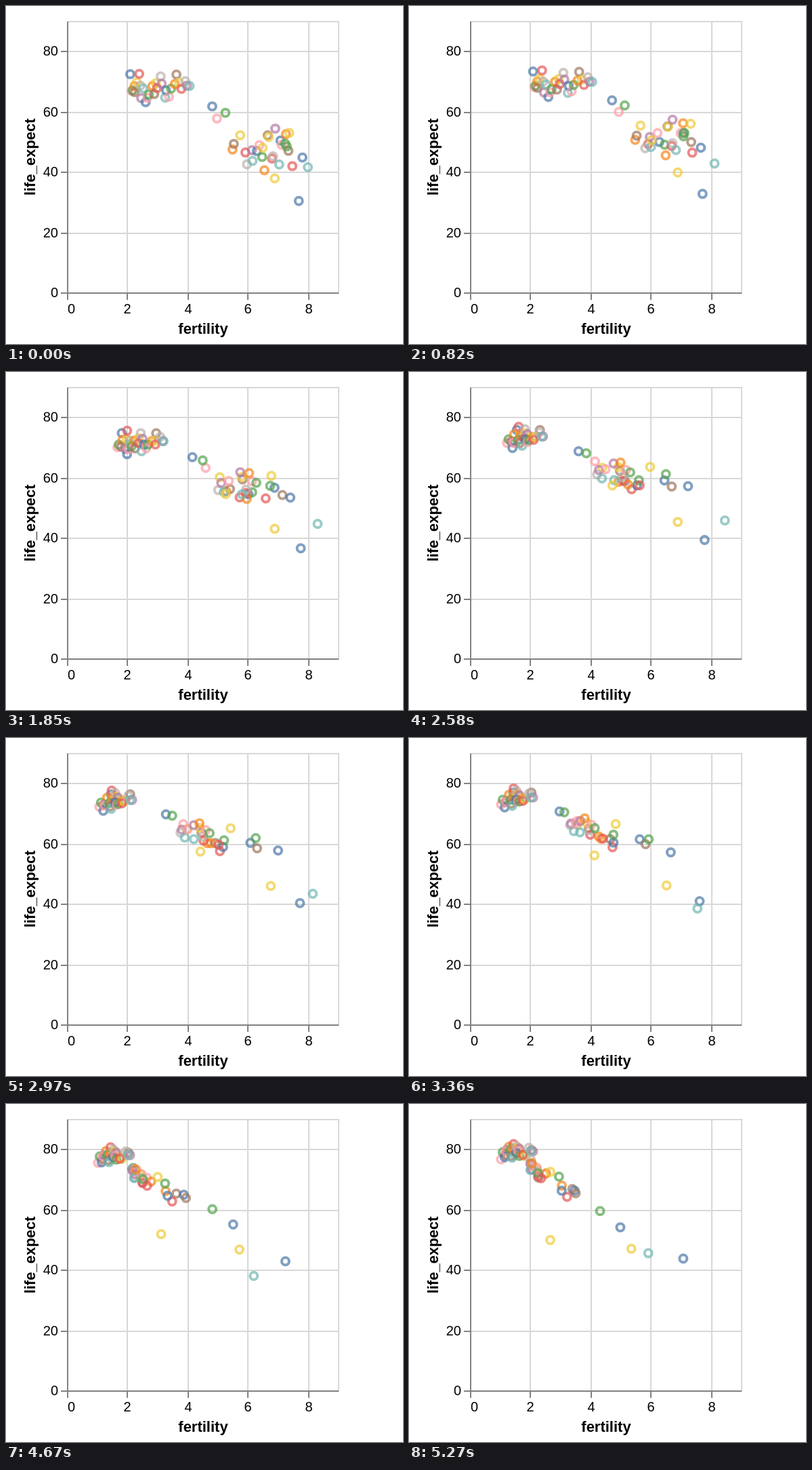
Recreate the animation shown at these times as an HTML page. Size 586 by 498 pixels, loop 5.3 s.

```html
<!DOCTYPE html>
<html lang="en">
<head>
<meta charset="utf-8">
<title>Fertility and life expectancy</title>
<style>
  html, body { margin: 0; width: 100%; height: 100%; overflow: hidden; background: #fff; }
  svg { display: block; width: 586px; height: 498px; }
  text { font: 20px "Liberation Sans", Arial, sans-serif; fill: #000; }
  .title { font-size: 22px; font-weight: bold; text-anchor: middle; }
  .grid { stroke: #d8d8d8; stroke-width: 2; fill: none; }
  .axis { stroke: #828282; stroke-width: 2; }
  circle { fill: none; stroke-width: 4; opacity: .7; }
</style>
</head>
<body>
<svg id="stage" viewBox="0 0 586 498"></svg>
<script>
const LOOP = 5300, HOLD = 190, TRAVEL = 5130;
const LEFT = 90, BOTTOM = 422, SIZE = 400;
const BLUE = '#4c78a8', TEAL = '#72b7b2', GREEN = '#54a24b', YELLOW = '#eeca3b';
const COLORS = [BLUE, '#f58518', '#e45756', TEAL, GREEN,
  YELLOW, '#b279a2', '#ff9da6', '#9d755d', '#bab0ac'];

const toX = fertility => LEFT + fertility * SIZE / 9;
const toY = life => BOTTOM - life * SIZE / 90;
const mix = (a, b, p) => a + (b - a) * p;
const clamp = p => Math.min(1, Math.max(0, p));
const smooth = p => p * p * (3 - 2 * p);

let seed = 29;
function random() {
  seed = (seed * 16807) % 2147483647;
  return seed / 2147483647;
}
const spread = amount => (random() + random() - 1) * amount;

// Evenly timed [fertility, life] points joined by straight moves.
function keyed(points) {
  return u => {
    const place = u * (points.length - 1);
    const i = Math.min(points.length - 2, Math.floor(place));
    return [0, 1].map(k => mix(points[i][k], points[i + 1][k], place - i));
  };
}

// Small families from the start: an early fall, then mostly longer lives.
function settled(rank) {
  const f0 = 2.1 + 2 * rank ** 1.3;
  const l0 = 68 + spread(6);
  const f1 = 1.6 + .3 * (f0 - 3) + .05 * (l0 - 69) + spread(.25);
  const l1 = 79.5 + .25 * (l0 - 69) + spread(2.5);
  return u => [mix(f0, f1, smooth(clamp(2 * u - .2))), mix(l0, l1, u)];
}

// Large families: a long fall, slower where the end is higher.
function changing(rank) {
  const f0 = 4.3 + 3.2 * rank ** .5;
  const l0 = 49 + Math.max(0, 5.6 - f0) * 14 + spread(10);
  const f1 = 2 + 1.6 * random() ** 2;
  const l1 = 75 - 6 * (f1 - 2) + spread(3.5);
  const pace = 1 + (f1 - 2) * .5;
  return u => [
    mix(f0, f1, smooth(u ** pace)),
    mix(l0, l1, u + .3 * u * (1 - u))
  ];
}

const stage = document.getElementById('stage');

function add(tag, attrs, text = '') {
  const el = document.createElementNS('http://www.w3.org/2000/svg', tag);
  for (const key in attrs) el.setAttribute(key, attrs[key]);
  el.textContent = text;
  return stage.appendChild(el);
}
const line = (cls, x1, y1, x2, y2) => add('line', { class: cls, x1, y1, x2, y2 });

function drawChart() {
  const x0 = LEFT + 1, y0 = BOTTOM + 1, x1 = x0 + SIZE, y1 = y0 - SIZE;
  const even = v => 2 * Math.round(v / 2);
  const ticks = [0, 1, 2, 3, 4].map(i => ({
    i, x: even(toX(2 * i)) + 1, y: even(toY(20 * i)) + 1
  }));
  add('rect', { class: 'grid', x: x0, y: y1, width: SIZE, height: SIZE });
  for (const { x, y } of ticks) {
    line('grid', x, y1, x, y0);
    line('grid', x0, y, x1, y);
  }
  for (const { i, x, y } of ticks) {
    line('axis', x, y0, x, y0 + 10);
    line('axis', x0 - 10, y, x0, y);
    add('text', { x, y: 453, 'text-anchor': i ? 'middle' : 'start' }, 2 * i);
    add('text', { x: 77, y: y + 6, 'text-anchor': 'end' }, 20 * i);
  }
  line('axis', x0 - 1, y0, x1, y0);
  line('axis', x0, y1, x0, y0 + 1);
  add('text', { class: 'title', x: 291, y: 483 }, 'fertility');
  add('text', { class: 'title', transform: 'translate(43 222.5) rotate(-90)' }, 'life_expect');
}

const dots = [];
function addDot(color, at) {
  dots.push({ el: add('circle', { r: 5.48, stroke: color }), at });
}
function addGroup(count, makePath) {
  for (let i = 0; i < count; i++) {
    addDot(COLORS[i * 7 % COLORS.length], makePath((i + random()) / count));
  }
}

drawChart();
addGroup(30, settled);
addGroup(27, changing);

// The few that stay well apart from the crowd.
addDot(BLUE, keyed([[7.7, 30.3], [7.8, 39.9], [7.07, 43.8]]));
addDot(BLUE, keyed([[7.82, 44.7], [7.2, 58], [4.95, 54]]));
addDot(GREEN, keyed([[7.3, 48.4], [6.45, 62], [4.28, 59.4]]));
addDot(YELLOW, keyed([[6.9, 37.8], [6.9, 45.8], [5.33, 47]]));
addDot(YELLOW, keyed([[6.5, 48], [4.6, 58], [2.63, 49.7]]));
addDot(TEAL, keyed([[8, 41.5], [8.25, 44], [8.5, 46], [6.5, 30], [5.9, 46.1]]));

function render(time) {
  const u = clamp((time % LOOP - HOLD) / TRAVEL);
  for (const { el, at } of dots) {
    const [fertility, life] = at(u);
    el.setAttribute('cx', toX(fertility));
    el.setAttribute('cy', toY(life));
  }
}

const began = performance.now();
function tick() {
  render(performance.now() - began);
  requestAnimationFrame(tick);
}
tick();
</script>
</body>
</html>
```
